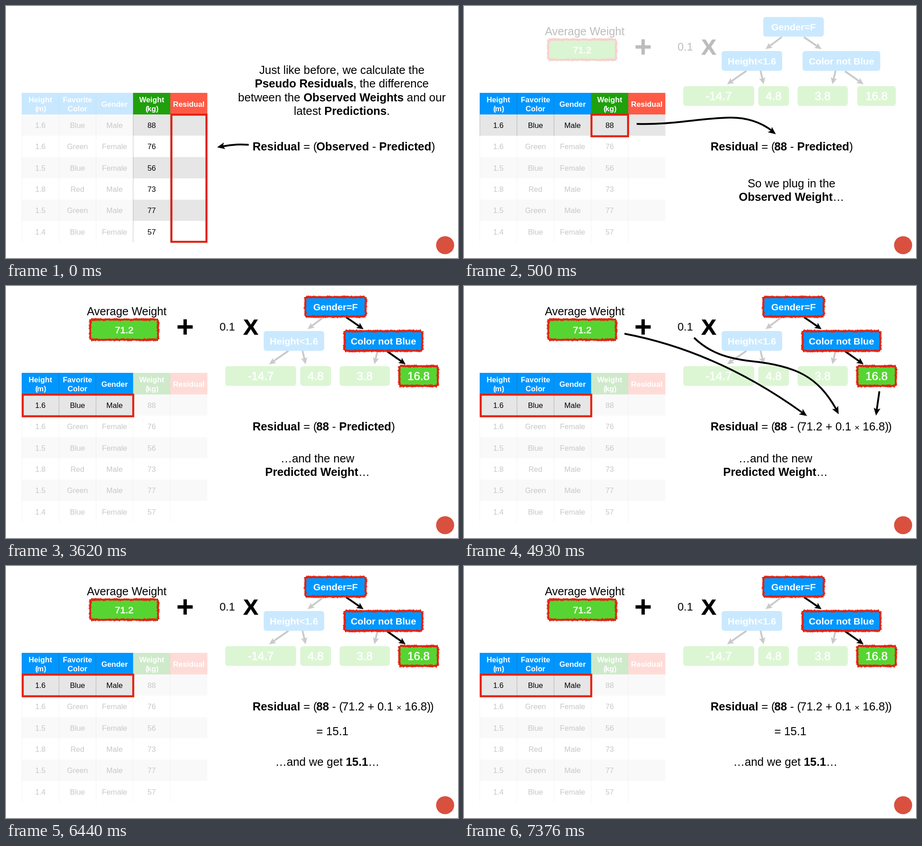
Write an HTML page that moves like this. It is 1000 px wide and 560 px high and loops after 8 s.

```html
<!DOCTYPE html>
<html lang="en">
<head>
<meta charset="utf-8">
<title>Residual lesson</title>
<style>
  html, body { margin: 0; width: 100%; height: 100%; overflow: hidden; background: #fff; }
  svg { display: block; width: 1000px; height: 560px; }
  text { font-family: "Liberation Sans", Arial, sans-serif; white-space: pre; }
  .b { font-weight: 700; }
  .paren { letter-spacing: -1.8px; }
</style>
</head>
<body>
<svg id="stage" viewBox="0 0 1000 560"></svg>
<script>
const BLUE = '#0096ff', GREEN = '#56d532', RED = '#e3200f';
const FADE = 0.21;
const LOOP = 8000;
const STARTS = [0, 500, 3620, 4930, 6440];

const group = (body, opacity = 1) => `<g opacity="${opacity}">${body}</g>`;

// *word* is bold; parentheses are set a little tighter
function rich(s) {
  return s.split('*').map((part, i) => {
    const body = part
      .replace(/</g, '&lt;')
      .replace(/[()]/g, c => `<tspan class="paren">${c}</tspan>`)
      .replace('×', '<tspan font-size="19">×</tspan>');
    return i % 2 ? `<tspan class="b">${body}</tspan>` : body;
  }).join('');
}

function text(x, y, s, { size = 25.3, fill = '#000', anchor = 'middle', extra = '' } = {}) {
  return `<text x="${x}" y="${y}" font-size="${size}" fill="${fill}" text-anchor="${anchor}" ${extra}>${rich(s)}</text>`;
}

const lines = (x, y, list) => list.map((s, i) => text(x, y + i * 30.4, s)).join('');
const formula = s => text(545.5, 321, s, { anchor: 'start' });

function frame(x0, y0, x1, y1) {
  return `<rect x="${x0}" y="${y0}" width="${x1 - x0}" height="${y1 - y0}" fill="none" stroke="${RED}" stroke-width="4.4"/>`;
}

// The head points from (fx, fy) to the tip
function arrow(path, fx, fy, tx, ty, width = 4, len = 17, half = 7.5) {
  const angle = Math.atan2(ty - fy, tx - fx) * 180 / Math.PI;
  return `<path d="${path}" fill="none" stroke="#000" stroke-width="${width}"/>` +
    `<path d="M0 0L${-len} ${-half}L${-len * 0.78} 0L${-len} ${half}Z" transform="translate(${tx} ${ty}) rotate(${angle})"/>`;
}

function straight(x0, y0, x1, y1) {
  const d = Math.hypot(x1 - x0, y1 - y0), k = (d - 11) / d;
  const path = `M${x0} ${y0}L${x0 + (x1 - x0) * k} ${y0 + (y1 - y0) * k}`;
  return arrow(path, x0, y0, x1, y1, 4, 15, 7);
}

function random(seed) {
  return () => (seed = (seed * 16807) % 2147483647) / 2147483647;
}

// Crayon outline around a box
function scribble(x, y, w, h) {
  const rnd = random(Math.round(x * 31 + y * 7 + w));
  const corners = [[x, y], [x + w, y], [x + w, y + h], [x, y + h]];
  const pts = [];
  let side = 1;
  corners.forEach(([ax, ay], i) => {
    const [bx, by] = corners[(i + 1) % 4];
    const d = Math.hypot(bx - ax, by - ay), ux = (bx - ax) / d, uy = (by - ay) / d;
    for (let s = 2; s < d - 1; s += 1.9) {
      const off = side * (0.6 + rnd() * 1.7);
      side = -side;
      pts.push(`${(ax + ux * s - uy * off).toFixed(1)} ${(ay + uy * s + ux * off).toFixed(1)}`);
    }
  });
  return `<path d="M${pts.join('L')}Z" fill="none" stroke="${RED}" stroke-width="3" stroke-linejoin="round"/>`;
}

function box(x, y, w, h, fill, label, size, marked) {
  const bold = fill === BLUE;
  const extra = bold ? '' : 'stroke="#fff" stroke-width=".7"';
  return `<rect x="${x}" y="${y}" width="${w}" height="${h}" rx="6" fill="${fill}"/>` +
    (marked ? scribble(x, y, w, h) : '') +
    text(x + w / 2, y + h / 2 + size * 0.36, bold ? `*${label}*` : label, { size, fill: '#fff', extra });
}

const COLS = [
  ['Height|(m)', BLUE], ['Favorite|Color', BLUE], ['Gender', BLUE],
  ['Weight|(kg)', '#1fa00c'], ['Residual', '#ff5a45']
];
const ROWS = [
  '1.6 Blue Male 88', '1.6 Green Female 76', '1.5 Blue Female 56',
  '1.8 Red Male 73', '1.5 Green Male 77', '1.4 Blue Female 57'
].map(r => r.split(' '));

function cell(r, c) {
  const x = 35 + 82.1 * c, y = r < 0 ? 193 : 241 + 47.35 * r, h = r < 0 ? 48 : 47.35;
  const mid = x + 41, fill = r < 0 ? COLS[c][1] : r % 2 ? '#fff' : '#e6e6e6';
  const rect = `<rect x="${x}" y="${y}" width="82.1" height="${h}" fill="${fill}"/>` +
    `<path d="M${x} ${y}v${h}" stroke="#000" stroke-opacity=".3" stroke-width=".8"/>`;
  if (r >= 0) return rect + text(mid, y + 30, ROWS[r][c] || '', { size: 16.7 });
  const parts = COLS[c][0].split('|');
  return rect + parts.map((s, i) =>
    text(mid, (parts.length > 1 ? 213.5 : 223.5) + i * 20.5, `*${s}*`, { size: 16.7, fill: '#fff' })).join('');
}

function table(isLit) {
  let lit = '', dim = '';
  for (let r = -1; r < 6; r++)
    for (let c = 0; c < 5; c++)
      if (isLit(r, c)) lit += cell(r, c); else dim += group(cell(r, c), FADE);
  return dim + lit;
}

function model(lit) {
  const on = lit ? 1 : FADE;
  const signs = text(267, 65, 'Average Weight', { size: 24.9 }) + text(489.5, 98.5, '0.1', { size: 24.5 }) +
    '<path d="M379.5 91H413M396.3 74V108" stroke="#000" stroke-width="7.4"/>' +
    text(541.5, 108, '*X*', { size: 49, extra: 'stroke="#000" stroke-width="1"' });
  const dim = straight(703, 69, 667, 96) + straight(625, 144, 582, 174) +
    straight(656, 144, 663, 174) + straight(822, 144, 815, 174) +
    box(570, 100, 134, 44, BLUE, 'Height<1.6', 21) +
    box(485, 178, 157, 44, GREEN, '-14.7', 25.3) +
    box(651, 178, 68, 44, GREEN, '4.8', 25.3) +
    box(738, 178, 111, 44, GREEN, '3.8', 25.3);
  const path = straight(752, 69, 791, 96) + straight(843, 145, 884, 174) +
    box(662, 24.5, 134, 43.5, BLUE, 'Gender=F', 21, lit) +
    box(749, 100, 172, 44, BLUE, 'Color not Blue', 21, lit) +
    box(870, 178, 85.5, 44, GREEN, '16.8', 25.3, lit);
  return group(signs, lit ? 1 : 0.26) +
    group(box(186.5, 74.5, 150, 45, GREEN, '71.2', 21, true), on) +
    group(dim, FADE) + group(path, on);
}

const predictedView = model(true) + table((r, c) => r < 1 && c < 3) + frame(37, 241.5, 281.5, 289.5);
const plugged = formula('*Residual* = (*88* - (71.2 + 0.1 × 16.8))');
const newWeight = lines(689, 392, ['…and the new', '*Predicted Weight*…']);

const scenes = [
  table((r, c) => c > 2) + frame(366, 241.5, 443.5, 524) +
    lines(743, 151, ['Just like before, we calculate the', '*Pseudo Residuals*, the difference',
      'between the *Observed Weights* and our', 'latest *Predictions*.']) +
    arrow('M537 308.5C515 306.5 497 308 479 312', 484, 310.5, 467, 314) +
    formula('*Residual* = (*Observed* - *Predicted*)'),

  model(false) + table(r => r < 1) + frame(282, 241.5, 363, 289.5) +
    arrow('M382 262C460 265 530 248 590 248C630 248 660 261 681 277', 672, 271, 690, 285) +
    formula('*Residual* = (*88* - *Predicted*)') +
    lines(724.5, 403, ['So we plug in the', '*Observed Weight*…']),

  predictedView + formula('*Residual* = (*88* - *Predicted*)') + newWeight,

  predictedView +
    arrow('M355 106Q560 145 748 281', 735, 272, 759, 289) +
    arrow('M509 115C545 150 585 161 635 167C735 177 783 202 823 273', 818, 264, 829, 285) +
    arrow('M919 234L913 276', 919, 234, 911.5, 288) + plugged + newWeight,

  predictedView + plugged + text(722, 376, '= 15.1') + text(711, 443.5, '…and we get *15.1*…')
];

const stage = document.getElementById('stage');
stage.innerHTML = scenes.map(s => `<g class="scene" visibility="hidden">${s}</g>`).join('') +
  '<circle cx="971.5" cy="531.5" r="20" fill="#d9503f"/>';
const layers = [...stage.querySelectorAll('.scene')];
const begin = performance.now();

function draw() {
  const t = (performance.now() - begin) % LOOP;
  const now = STARTS.findLastIndex(s => t >= s);
  layers.forEach((g, i) => g.setAttribute('visibility', i === now ? 'visible' : 'hidden'));
  requestAnimationFrame(draw);
}
draw();
</script>
</body>
</html>
```
